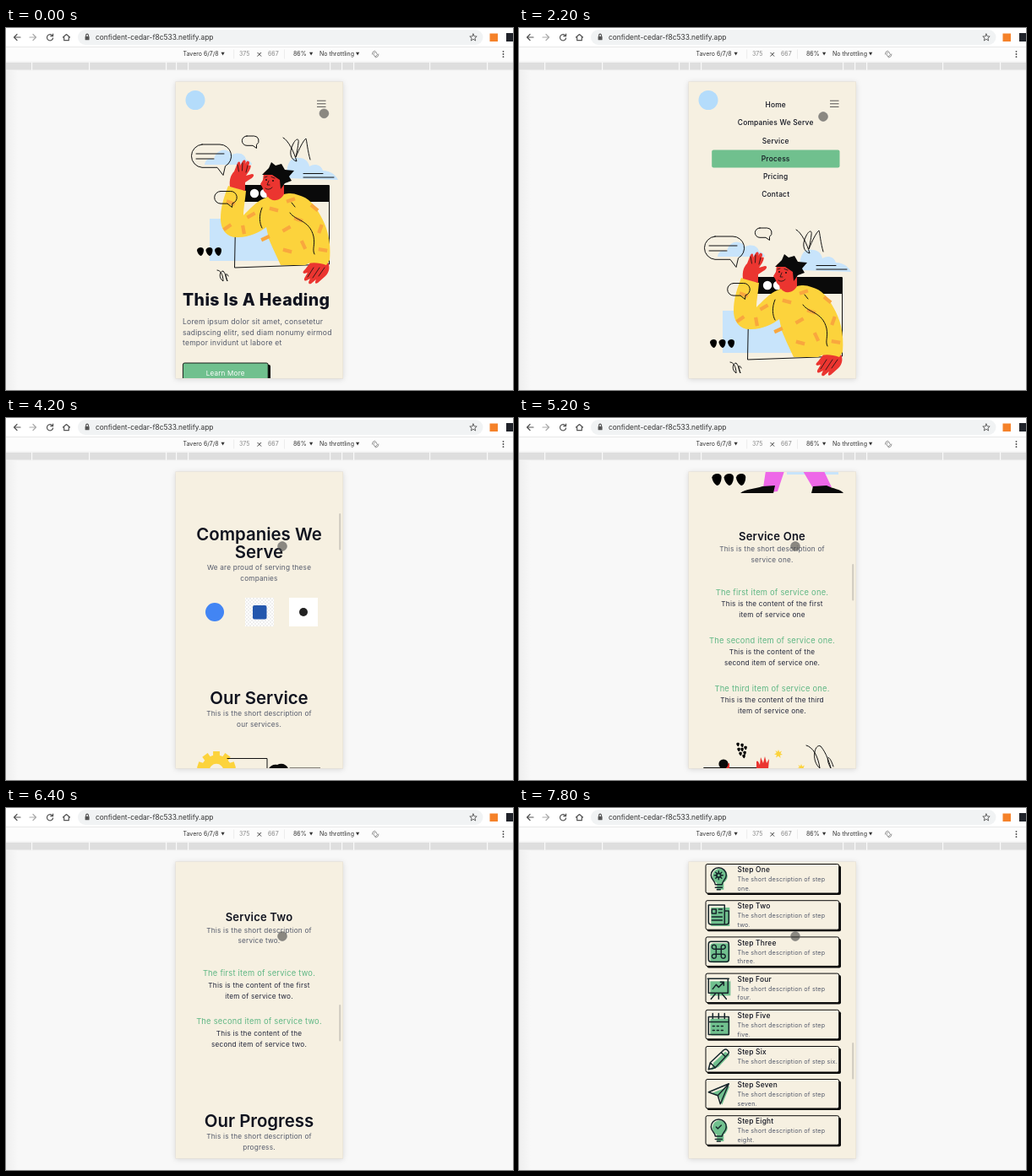
An HTML page for the animation above (8000 ms loop, 600x429 px).

```html
<!DOCTYPE html>
<html lang="en">
<head>
<meta charset="utf-8">
<title>Mobile page preview</title>
<style>
html, body { margin: 0; width: 100%; height: 100%; overflow: hidden; background: #f8f8f8; }
svg { display: block; width: 100vw; height: 100vh; }
text { font-family: Inter, "Noto Sans", sans-serif; }
.ui { font-size: 7px; fill: #333; }
.dim { fill: #888; }
.url { font-size: 8.4px; fill: #333; }
.hero { font-size: 19.5px; font-weight: 800; letter-spacing: .4px; fill: #10131f; }
.h2 { font-size: 20.4px; font-weight: 600; fill: #10131f; }
.h3 { font-size: 13px; font-weight: 600; letter-spacing: .015em; fill: #10131f; }
.p, .d, .nav { font-size: 8.2px; letter-spacing: .026em; fill: #545a6b; }
.lead { font-size: 8.55px; letter-spacing: .026em; fill: #545a6b; }
.d { fill: #22263a; }
.nav { font-size: 8.4px; font-weight: 500; fill: #10131f; }
.g { font-size: 9.3px; letter-spacing: .026em; fill: #5fb784; }
.s { font-size: 7.2px; letter-spacing: .026em; fill: #545a6b; }
.btn { font-size: 8.1px; letter-spacing: .026em; fill: #fff; }
.mid { text-anchor: middle; }
.ln { fill: none; stroke: #111; stroke-width: 1; stroke-linecap: round; stroke-linejoin: round; }
.thin { stroke-width: .8; }
.ico { fill: none; stroke: #16252a; stroke-width: 1.5; stroke-linecap: round; stroke-linejoin: round; }
</style>
</head>
<body>
<svg id="stage" viewBox="0 0 600 429" preserveAspectRatio="none"></svg>
<script>
const LOOP = 8000, STEP = 200, MENU_SHIFT = 109;
const C = { bg: '#f6f0e1', blue: '#c8e4fb', yel: '#fcd33c', org: '#f9a73e', red: '#eb3530',
            pink: '#ee68e8', green: '#70c08e', ink: '#0a0a0a' };

// ---- markup helpers
const text = (x, y, cls, s) => `<text x="${x}" y="${y}" class="${cls}">${s}</text>`;
const mid = (y, cls, s, x = 299.5) => text(x, y, cls + ' mid', s);
const rect = (x, y, w, h, fill, more = '') => `<rect x="${x}" y="${y}" width="${w}" height="${h}" fill="${fill}" ${more}/>`;
const dot = (x, y, r, fill) => `<circle cx="${x}" cy="${y}" r="${r}" fill="${fill}"/>`;
const shape = (d, fill) => `<path d="${d}" fill="${fill}"/>`;
const line = (d, cls = '') => `<path d="${d}" class="ln ${cls}"/>`;
const at = (x, y, body) => `<g transform="translate(${x} ${y})">${body}</g>`;
const drop = (x, y, k = 1) =>
  `<path transform="translate(${x} ${y}) scale(${k})" d="M-4 -2C-3 -6 4 -6 4 -2C4 2 2 5 .5 5C-1 5 -4 1 -4 -2Z"/>`;
const drops = (x, y, gap, k) => [0, 1, 2].map(i => drop(x + i * gap, y, k)).join('');

// ---- browser frame
function chrome() {
  const ui = (d, c = '#555', w = 1.2) => `<path d="${d}" class="ln" style="stroke:${c};stroke-width:${w}"/>`;
  const caret = x => shape(`M${x} 28.8h4.2l-2.1 3.6z`, '#333');
  const seams = [30, 98, 189, 201, 215, 383, 397, 411, 501, 569];
  return rect(0, 0, 600, 22.5, '#fff') + rect(85, 2, 479.5, 18, '#f1f3f4', 'rx="9"')
    + ui('M17 11H9.5M13 7.5L9.5 11L13 14.5') + ui('M28 11H35.5M32 7.5L35.5 11L32 14.5', '#aaa')
    + ui('M54.8 8.8A3.6 3.6 0 1 0 55.6 12M55.6 7V9.7H52.9') + ui('M67.5 11L71.5 7.5L75.5 11M68.7 10.5V14.7H74.3V10.5')
    + rect(93.6, 10, 5, 4.3, '#555', 'rx=".6"') + ui('M94.7 10V8.6A1.4 1.4 0 0 1 97.5 8.6V10')
    + text(106, 14.2, 'url', 'confident-cedar-f8c533.netlify.app')
    + ui('M553 7L554.2 9.8L557.2 10L554.9 12L555.7 15L553 13.3L550.3 15L551.1 12L548.8 10L551.8 9.8Z', '#555', .9)
    + rect(572.5, 6.5, 9.5, 9.5, '#f5822a') + rect(592, 6, 9, 10, '#20232a')
    + rect(0, 22, 600, 17.5, '#fcfcfc') + rect(0, 22, 600, .6, '#ddd')
    + text(209.5, 33.4, 'ui', 'Tavero 6/7/8') + caret(254.5)
    + text(276, 33.4, 'ui dim', '375') + text(310, 33.4, 'ui dim', '667')
    + rect(269.5, 25.5, .6, 11, '#e2e2e2') + rect(329, 25.5, .6, 11, '#e2e2e2')
    + ui('M297.8 29.3l4 4m0-4l-4 4', '#444', 1)
    + text(340, 33.4, 'ui', '86%') + caret(359) + text(371, 33.4, 'ui', 'No throttling') + caret(414)
    + ui('M435 30.5L437.5 28L439.5 31.500L437 34ZM433.3 31A4 4 0 0 1 436.500 27M441 31A4 4 0 0 1 437.500 35', '#666', .7)
    + [27.8, 31, 34.2].map(y => dot(588.5, y, .9, '#444')).join('')
    + rect(0, 39.5, 600, 11, '#f4f4f4') + rect(0, 41, 600, 8.5, '#dedede')
    + seams.map(x => rect(x, 40.5, 1.2, 9.5, '#fafafa')).join('')
    + rect(0, 50.5, 14, 380, 'url(#edge)');
}

// ---- hero picture
function heroArt() {
  const patch = [[266, 207, 20], [262, 236, -35], [281, 239, 80], [290, 222, -30], [307, 249, -25], [317, 215, 15],
    [337, 204, -20], [332, 238, -30], [346, 227, 20], [352, 257, 65], [333, 264, 15], [365, 213, 40],
    [372, 238, -70], [375, 263, 10]];
  return shape('M235 162C236 154 243 154 246 156C248 143 262 141 267 150C277 146 283 150 284 156C289 157 291 160 291 162Z', C.blue)
    + shape('M333 178C331 168 334 154 343 154C353 153 358 158 359 164C365 160 373 162 375 169C384 169 390 174 393 180Z', C.blue)
    + rect(241, 226, 82, 50, C.blue)
    + line('M225 149H258M225 155H246')
    + line('M232 138H253A13.7 13.7 0 0 1 259.5 163.7L257 174.5L250 165.3H232A13.7 13.7 0 0 1 232 138Z')
    + line('M285 128H293.5A5.6 5.6 0 0 1 296.5 138.3L296.5 142.5L292 139.3H285A5.6 5.6 0 0 1 285 128Z')
    + line('M328 130C334 133 341 147 344 158C337 156 334 148 340 137C343 131 347 130 346 136C345 145 343 152 343 153C347 143 352 133 355 131C356 134 357 146 360 156')
    + line('M352 172.5H375M352 177H388')
    + rect(280, 186, 102.5, 20, C.ink) + dot(294, 196, 5.2, '#fff') + dot(306, 196, 5.2, '#fff')
    + line('M382.5 187V280L270.5 284L272 206')
    + shape('M361 277L381 278C384 284 382 290 378 294L369 302C366 304 365 302 367 298L361 303C358 304 357 302 360 297L355 299.5C353 300 352 298 354 295L357 290L353 291C350 290 352 288 354 286Z', C.red)
    + shape('M307 187L329 186L329 201C324 208 313 207 309 202Z', C.red)
    + shape('M263 187L284 193C283 205 281 214 281 222C288 215 295 207 303 203L310 200C314 206 324 206 329 197C336 195 341 196 346 198C358 201 366 210 372 222C380 236 385 252 383 275L379 281C370 278 360 277 354 281L325 281C320 270 316 262 311 250L308 236C300 242 288 248 275 248C262 249 254 240 254 226C254 210 259 198 263 187Z', C.yel)
    + patch.map(([x, y, a]) => rect(-5.3, -2.1, 10.6, 4.2, C.org, `transform="translate(${x} ${y}) rotate(${a})"`)).join('')
    + shape('M265 188C264 180 266 174 270 170L274 160C276 157 278 159 277 163L280 158C282 155 285 157 283 161L285 158C288 157 289 160 287 163C291 161 290 165 288 169L284 175L291 173C295 173 293 177 289 179L283 183L283 193Z', C.red)
    + line('M274 162L275.5 170M280 160L279.5 169M286 163L284 171', 'thin')
    + shape('M305 172C310 166 322 168 328 175L327 190C322 200 309 200 305 193L303 188L301 185L304 180Z', C.red)
    + shape('M303 174L311 166L314 159L319 163L326 161L330 168L341 169L335 176L338 181L330 184L325 191L324 180L315 174Z', C.ink)
    + dot(308, 180, .9, C.ink) + dot(316, 181, .9, C.ink)
    + line('M306 177L309 176M314 176.5L318 178M311 181L309 186H312M307 190Q311 193 315 189M326 183Q330 184 326 189', 'thin')
    + line('M336 219C343 229 359 227 364 247C366 258 362 262 365 268M303 213C299 222 300 232 303 237M338 207L342 212')
    + line('M364 284L357 295M371 284L363 296M377 284L370 294', 'thin')
    + line('M254 193.5H265.8A7.3 7.3 0 0 1 268 207.8L267.5 212.5L262 208.1H254A7.3 7.3 0 0 1 254 193.5Z')
    + drops(230, 265, 10.5, 1)
    + line('M250 287C254 287 257 293 257 300C251 296 253 288 257 288C260 291 261 297 262 300C258 292 261 289 263 294');
}

// ---- service pictures
function gear(x, y, r, fill) {
  let teeth = '';
  for (let a = 0; a < 360; a += 36)
    teeth += rect(-r * .17, -r, r * .34, r * .5, fill, `transform="rotate(${a})"`);
  return at(x, y, teeth + dot(0, 0, r * .8, fill) + dot(0, 0, r * .36, C.bg));
}
function serviceOneArt() {
  return rect(317, 842, 61, 96, C.blue) + gear(249, 805, 23, C.yel)
    + line('M262 790.5H309V802M336 802H372V838')
    + gear(357, 866, 14, C.org)
    + shape('M288 960L298 894L342 894L370 953L349 956L322 910L306 958Z', C.pink)
    + shape('M262 960C268 955 280 955 288 952L303 951L301 960ZM346 960L348 952L364 951C372 955 380 955 384 960Z', C.ink)
    + shape('M300 830L340 830C347 850 345 875 343 898L297 898C297 875 295 850 300 830Z', C.yel)
    + shape('M302 832L276 852L262 828L268 824L279 840L300 828ZM338 831L364 846L354 874L347 871L354 850L338 842Z', C.yel)
    + dot(264, 824, 5, C.red) + dot(350, 875, 5, C.red)
    + shape('M311 808H332V826C328 835 315 835 312 829Z', C.red)
    + shape('M310 814C307 803 314 796 321 798C328 794 337 800 334 809L331 817L327 809Z', C.ink)
    + line('M318 813v1M325 813v1M318 821Q321 824 325 820')
    + drops(234, 944, 14.3, 1.4);
}
function spark(x, y) {
  return at(x, y, shape('M0 -5L1.2 -2L4 -3.5L2.5 -.6L5 1L2 1.5L2.5 5L0 2.5L-3 4.5L-2 1.3L-5 .4L-2.2 -1L-3.5 -4L-1 -2.2Z', C.yel));
}
function serviceTwoArt() {
  const seeds = [[259, 1258], [264, 1259], [260, 1264], [264, 1264], [268, 1262], [262, 1269], [267, 1268], [266, 1272]];
  return rect(277, 1306, 79, 78, C.blue)
    + seeds.map(([x, y]) => drop(x, y, .45)).join('') + spark(307, 1269) + spark(334, 1286)
    + line('M340 1259C348 1261 354 1272 356 1286C345 1277 350 1256 357 1260C364 1268 368 1282 369 1286C362 1274 366 1266 372 1284')
    + line('M219 1285.5H292V1372H219Z')
    + shape('M229 1310C238 1299 252 1302 260 1312L278 1302L284 1287L293 1290L287 1310L264 1333L265 1372H229Z', C.yel)
    + shape('M239 1283L249 1280V1300C244 1305 239 1300 239 1296Z', C.red)
    + dot(242, 1281, 5.6, C.ink)
    + shape('M281 1290L281 1278C283 1276 284 1280 285 1282L286 1273L289 1280L291 1272L293 1280L296 1275L295 1287L291 1292Z', C.red)
    + dot(345, 1311, 8, C.red) + shape('M336 1309C338 1299 352 1299 354 1309L353 1320L349 1308Z', C.ink)
    + shape('M327 1328C335 1320 352 1320 359 1332L360 1378H326Z', C.pink)
    + shape('M326 1376H360L365 1414H353L344 1386L335 1414H322Z', C.org)
    + shape('M316 1418C320 1413 326 1413 335 1412V1418ZM352 1412C360 1413 366 1414 370 1418H352Z', C.ink)
    + drops(233, 1398, 11, 1);
}

// ---- step icons, centred on 0,0
const pen = (d, more = '') => `<path d="${d}" class="ico" ${more}/>`;
const bulb = inner => dot(1.5, -3, 9, C.green) + rect(-2, 5, 8, 8, C.green)
  + pen('M-4 7C-4 3 -9 1 -9 -4A9 9 0 0 1 9 -4C9 1 4 3 4 7ZM-4 10.5H4M-2 13H2') + inner;
const icons = [
  bulb(dot(0, -4, 3.2, '#16252a') + pen('M0 -9V1M-5 -4H5M-3.5 -7.5L3.5 -.5M3.5 -7.5L-3.5 -.5') + dot(0, -4, 1.5, C.green)),
  rect(-9, -9, 22, 22, C.green) + pen('M-12 -12H7V11H-9Q-12 11 -12 8ZM7 -5H12V8Q12 11 9 11H-8M-8 -7H-3V-2H-8ZM0 -7H4M0 -3H4M-8 2H4M-8 6H4'),
  rect(-10, -10, 23, 23, C.green, 'rx="4"') + pen('M-9 -12H9Q12 -12 12 -9V9Q12 12 9 12H-9Q-12 12 -12 9V-9Q-12 -12 -9 -12ZM-3 -3V-5A2.5 2.5 0 1 0 -5.5 -3H5.5A2.5 2.5 0 1 0 3 -5V5A2.5 2.5 0 1 0 5.5 3H-5.5A2.5 2.5 0 1 0 -3 5Z'),
  rect(-10, -8, 24, 17, C.green) + pen('M-13 -11H12M-12 -11V6H11V-11M-7 1L-3 -4L0 -1L6 -7M2 -7H6V-3M0 6V13M-4 7L-9 13M4 7L9 13'),
  rect(-10, -7, 23, 20, C.green, 'rx="2"') + pen('M-12 -9H12V12H-12ZM-12 -3H12M-7 -13V-7M0 -13V-7M7 -13V-7') + pen('M-7 2H7M-7 7H7', 'stroke-dasharray="2 3"'),
  shape('M-9 13L-6 4L8 -9L13 -5L0 9Z', C.green) + pen('M-12 12L-10 4L6 -11Q9 -13 11 -10Q13 -8 11 -6L-4 10ZM-10 4L-4 10M3 -8L8 -3'),
  shape('M-8 -1L13 -9L4 13L1 4Z', C.green) + pen('M-12 -2L12 -12L2 12L-1 2ZM-1 2L12 -12'),
  bulb(pen('M-3 -4L-1 -2L3 -6'))
];

// ---- page
const heading = (y, title, l1, l2) => mid(y, 'h2', title) + mid(y + 14, 'p', l1) + mid(y + 26.5, 'p', l2);
const service = (y, name, items) => mid(y, 'h3', 'Service ' + name)
  + mid(y + 13.5, 'p', 'This is the short description of') + mid(y + 26, 'p', `service ${name.toLowerCase()}.`)
  + items.map(([title, l1, l2], i) => mid(y + 65.3 + i * 57, 'g', title) + mid(y + 78.8 + i * 57, 'd', l1) + mid(y + 91.5 + i * 57, 'd', l2)).join('');

function steps() {
  let y = 1784.5;
  return ['One', 'Two', 'Three', 'Four', 'Five', 'Six', 'Seven', 'Eight'].map((name, i) => {
    const short = name === 'Six', h = short ? 30.5 : 34.5;
    const out = rect(222.5, y + 2, 158.5, h, C.ink, 'rx="2"') + rect(221, y, 157.7, h, C.bg, `rx="2" stroke="${C.ink}" stroke-width="1"`)
      + at(236.3, y + h / 2, icons[i]) + text(258.5, y + 9.6, 'nav', 'Step ' + name)
      + text(258.5, y + 20.6, 's', 'The short description of step' + (short ? ' six.' : ''))
      + (short ? '' : text(258.5, y + 31.2, 's', name.toLowerCase() + '.'));
    y += short ? 39 : 43.2;
    return out;
  }).join('');
}

function page() {
  return heroArt() + text(209, 328.5, 'hero', 'This Is A Heading')
    + ['Lorem ipsum dolor sit amet, consetetur', 'sadipscing elitr, sed diam nonumy eirmod', 'tempor invidunt ut labore et']
      .map((s, i) => text(209, 351 + i * 12.7, 'lead', s)).join('')
    + rect(211, 399, 102, 24.4, C.ink, 'rx="2"') + rect(209.4, 397, 100.8, 24.4, C.green, `rx="2" stroke="${C.ink}" stroke-width=".9"`)
    + mid(412.2, 'btn', 'Learn More', 259.7)
    + mid(532.2, 'h2', 'Companies We') + heading(553.3, 'Serve', 'We are proud of serving these', 'companies')
    + dot(247, 617, 11, '#4285f4') + rect(283, 600, 34, 34, 'url(#check)') + rect(292, 609, 16.5, 16.5, '#2457ad', 'rx="2"')
    + rect(335, 600, 34, 34, '#fff') + dot(352, 617, 5, '#222')
    + heading(726.3, 'Our Service', 'This is the short description of', 'our services.')
    + serviceOneArt()
    + service(1015.5, 'One', [
      ['The first item of service one.', 'This is the content of the first', 'item of service one'],
      ['The second item of service one.', 'This is the content of the', 'second item of service one.'],
      ['The third item of service one.', 'This is the content of the third', 'item of service one.']])
    + serviceTwoArt()
    + service(1489, 'Two', [
      ['The first item of service two.', 'This is the content of the first', 'item of service two.'],
      ['The second item of service two.', 'This is the content of the', 'second item of service two.']])
    + heading(1733, 'Our Progress', 'This is the short description of', 'progress.')
    + steps();
}

const nav = ['Home', 'Companies We Serve', 'Service', 'Process', 'Pricing', 'Contact']
  .map((s, i) => mid(94.3 + i * 21.1, 'nav', s, 303.7)).join('');

const stage = document.getElementById('stage');
stage.innerHTML = `<defs>
  <clipPath id="screen"><rect x="201" y="64" width="197.5" height="351"/></clipPath>
  <clipPath id="drawer"><rect id="drawerBox" x="201" y="81" width="198" height="0"/></clipPath>
  <pattern id="check" width="4" height="4" patternUnits="userSpaceOnUse"><path d="M0 0H4V4H0Z" fill="#fff"/><path d="M0 0H2V2H0ZM2 2H4V4H2Z" fill="#eee"/></pattern>
  <linearGradient id="edge"><stop stop-color="#efefef"/><stop offset="1" stop-color="#f8f8f8"/></linearGradient>
  </defs>` + rect(0, 0, 600, 429, '#f8f8f8') + chrome()
  + rect(200.5, 63.5, 198.5, 352, '#e3dccf', 'style="filter:drop-shadow(0 1px 3px #0002)"') + rect(201, 64, 197.5, 351, C.bg)
  + `<g clip-path="url(#screen)"><g id="scroller">${dot(224, 85.5, 11.5, '#b4dcfb')}
    <path d="M368 86.2H378.5M368 89.8H378.5M368 93.4H378.5" stroke="#444" stroke-width=".9"/>
    <g clip-path="url(#drawer)">${rect(228.2, 144.5, 151.3, 21, C.green, 'id="hover" rx="2"')}${nav}</g>
    <g id="body">${page()}</g></g></g>`
  + rect(394.2, 64, 2, 43.5, '#cfcac0', 'id="thumb" rx="1"')
  + '<circle id="touch" r="5.4" fill="#333" fill-opacity=".55" stroke="#777" stroke-opacity=".9" stroke-width=".7"/>';

const [scroller, body, drawerBox, hover, thumb, touch] =
  ['scroller', 'body', 'drawerBox', 'hover', 'thumb', 'touch'].map(id => document.getElementById(id));

// ---- motion
const ease = u => { u = Math.min(1, Math.max(0, u)); return u * u * (3 - 2 * u); };
const scrollKeys = [[3200, 0], [3400, 17.5], [4200, 387], [5200, 871], [6400, 1355], [7800, 1718]];
const touchKeys = [[0, 376.4, 101.3], [500, 373, 91], [900, 373, 92], [1500, 318, 154], [1900, 318, 154],
  [2200, 360, 105], [2400, 373, 91], [2800, 373, 91], [3300, 327, 152]];

function segment(keys, t) {
  let i = 0;
  while (i < keys.length - 2 && t >= keys[i + 1][0]) i++;
  return i;
}
function scrollAt(t) {
  const k = scrollKeys, n = k.length - 1;
  if (t <= k[0][0]) return 0;
  if (t >= k[n][0]) return k[n][1];
  const slope = i => i === 0 || i === n ? 0 : (k[i + 1][1] - k[i - 1][1]) / (k[i + 1][0] - k[i - 1][0]);
  const i = segment(k, t), h = k[i + 1][0] - k[i][0], u = (t - k[i][0]) / h, v = 1 - u;
  const y = k[i][1] * (1 + 2 * u) * v * v + k[i + 1][1] * u * u * (3 - 2 * u)
    + h * (slope(i) * u * v * v - slope(i + 1) * u * u * v);
  return Math.max(0, y);
}
function touchAt(t) {
  const i = segment(touchKeys, t), [t0, x0, y0] = touchKeys[i], [t1, x1, y1] = touchKeys[i + 1];
  const u = ease((t - t0) / (t1 - t0));
  return [x0 + (x1 - x0) * u, y0 + (y1 - y0) * u];
}

function draw(t) {
  const open = ease((t - 550) / 350) - ease((t - 2450) / 350);
  const top = scrollAt(t), [x, y] = touchAt(t);
  scroller.setAttribute('transform', `translate(0 ${-top})`);
  body.setAttribute('transform', `translate(0 ${MENU_SHIFT * open})`);
  drawerBox.setAttribute('height', 127 * open);
  hover.setAttribute('visibility', t >= 1500 ? 'visible' : 'hidden');
  thumb.setAttribute('visibility', top > 0 ? 'visible' : 'hidden');
  thumb.setAttribute('y', 65 + top * .124);
  touch.setAttribute('cx', x);
  touch.setAttribute('cy', y);
}

function tick() {
  const t = performance.now() % LOOP;
  draw(Math.floor(t / STEP) * STEP);
  requestAnimationFrame(tick);
}
draw(0);
tick();
</script>
</body>
</html>
```
